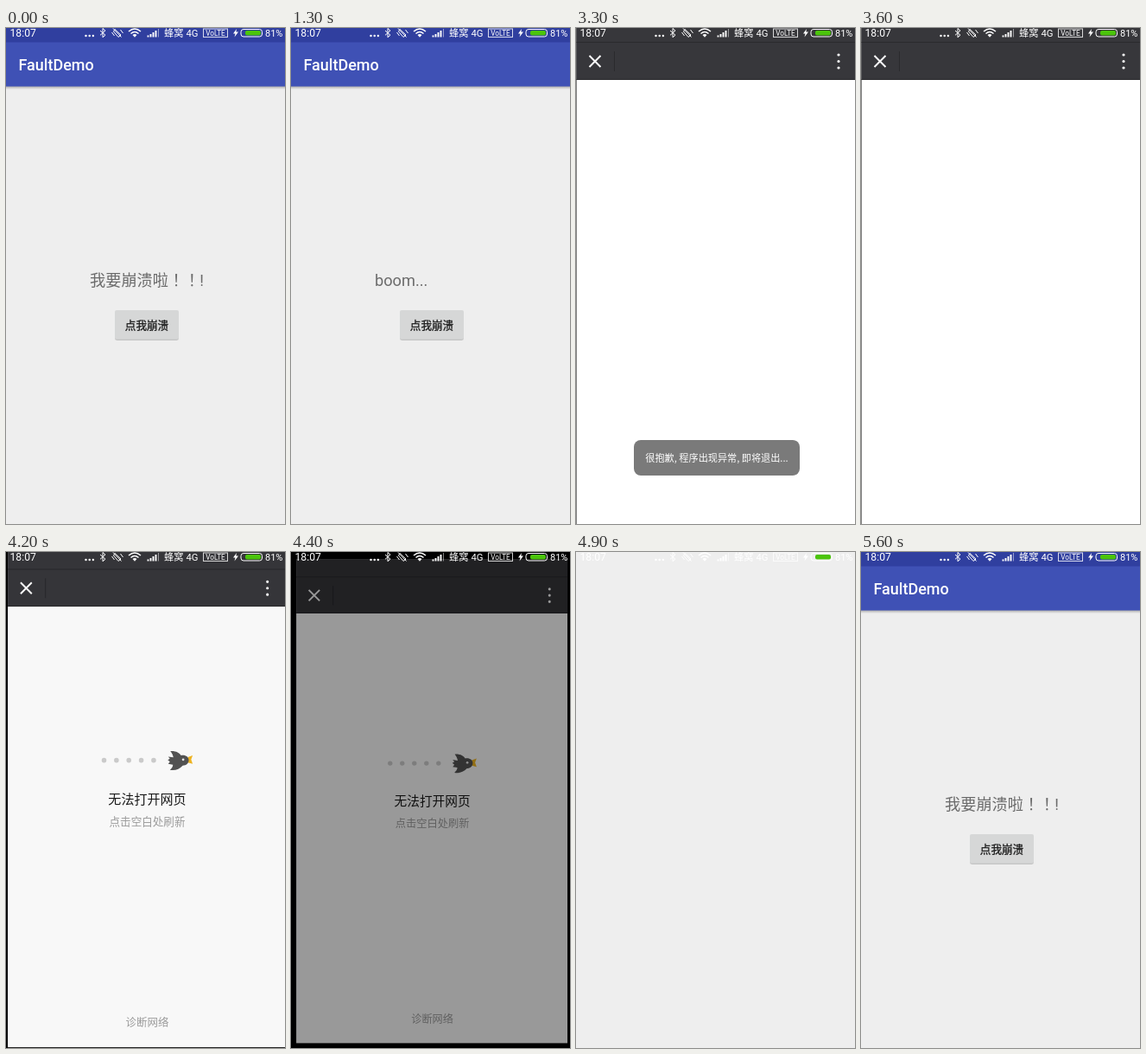
An HTML page that plays this animation: 323x573 px, repeating every 6.6 s.

```html
<!DOCTYPE html>
<html lang="zh-CN">
<head>
<meta charset="utf-8">
<title>Crash demo</title>
<style>
  html, body { margin: 0; width: 100%; height: 100%; overflow: hidden; background: #000; }
  svg { display: block; width: 100%; height: 100%; }
  text { font-family: Roboto, "Noto Sans CJK SC", "Noto Sans CJK", sans-serif; }
  .cjk { font-family: "Noto Sans CJK SC", "Noto Sans CJK", sans-serif; }
  .wide { font-family: "Noto Sans CJK JP", "Noto Sans CJK", sans-serif; }
  .mid { text-anchor: middle; }
  .line { fill: none; stroke: #fff; }
</style>
</head>
<body>
<svg viewBox="0 0 323 573">
  <defs>
    <linearGradient id="shade" x2="0" y2="1">
      <stop stop-opacity=".3"/>
      <stop offset="1" stop-opacity="0"/>
    </linearGradient>
  </defs>

  <g id="home">
    <rect width="323" height="573" fill="#eee"/>
    <rect y="67" width="323" height="4" fill="url(#shade)"/>
    <rect y="16" width="323" height="51.5" fill="#3f51b5"/>
    <rect width="323" height="16.5" fill="#303f9f"/>
    <text x="14.5" y="49" font-size="18" font-weight="500" fill="#fff">FaultDemo</text>
    <g font-size="18.2" fill="#6b6b6b">
      <text id="before" x="97" y="298">我要崩溃啦<tspan class="wide" lang="ja">！！</tspan>!</text>
      <text id="after" x="97" y="298">boom...</text>
    </g>
    <rect x="126" y="327" width="74" height="34" rx="2.5" opacity=".1"/>
    <rect x="126.5" y="327" width="73" height="33.4" rx="2" opacity=".15"/>
    <rect id="button" x="126" y="326" width="74" height="33.7" rx="2"/>
    <text class="cjk mid" x="163" y="347.7" font-size="12.6" fill="#1c1c1c" stroke="#1c1c1c" stroke-width=".3">点我崩溃</text>
  </g>

  <g id="page">
    <rect x=".5" y="-5" width="325" height="579" fill="#fff"/>
    <rect x=".5" y="-5" width="325" height="65" fill="#37373b"/>
    <path d="M.5 16.5h325M.5 59.5h325M44.5 27V50" stroke="#2a2a2d"/>
    <path class="line" d="M15.5 32l13 13m0-13l-13 13" stroke-width="2"/>
    <path class="line" d="M304 31h0m0 7.5h0m0 7.5h0" stroke-width="3.2" stroke-linecap="round"/>
    <g id="error">
      <path d="M113 239.3h0m14.5 0h0m14.5 0h0m14.5 0h0m14.5 0h0" stroke="#d0d0d0" stroke-width="5.6" stroke-linecap="round"/>
      <path d="M211 235.5l5.6-2-1.8 5 1.8 5-5.6-1.5z" fill="#f5b921"/>
      <path d="M190.5 228.5C197 228 201 230.5 203 233.5C208 232.5 212 235 212 239C212 243 209 245.5 205 245.5C201 250 196 251.5 190 250.5C192.5 248.5 193.5 246.5 193.5 244.5L188 243.5L190 241L187.5 239L190 237.5L188 235L194 236C193.5 233 192.5 231 190.5 228.5Z" fill="#555"/>
      <circle cx="205.5" cy="238.5" r="1.4" fill="#eee"/>
      <g class="mid">
        <text class="cjk" x="163.5" y="290" font-size="15.2" fill="#1a1a1a">无法打开网页</text>
        <text class="cjk" x="163.5" y="315.5" font-size="12.7" fill="#a0a0a0">点击空白处刷新</text>
        <text class="cjk" x="163.5" y="549.4" font-size="12.6" fill="#a0a0a0">诊断网络</text>
      </g>
    </g>
  </g>

  <rect id="splash" width="323" height="573" fill="#eee"/>

  <g id="toast">
    <rect x="67" y="476" width="192" height="41" rx="8" fill="#595959"/>
    <text class="cjk mid" x="163" y="501" font-size="11.15" fill="#fff">很抱歉, 程序出现异常, 即将退出...</text>
  </g>

  <g id="status" fill="#fff">
    <text x="4.5" y="10" font-size="12.2">18:07</text>
    <path class="line" d="M92.5 9h0m4.2 0h0m4.2 0h0" stroke-width="2.5" stroke-linecap="round"/>
    <path class="line" d="M109 3l6 5.2-3 2.6v-10.3l3 2.6-6 5.2"/>
    <path class="line" d="M126 1.5l7 6.5-3 2.5-5.5-6.5zM122.5 5l3 4m7-7l3 4M124 .5l9.5 10"/>
    <path class="line" d="M142 4q7-6 14 0M144.5 6.500q4.5-4 9 0" stroke-width="1.5"/>
    <path d="M146.5 8q2.5-2 5 0l-2.5 2.8z"/>
    <path class="line" d="M164.5 10.5v-2m3 2v-3.5m3 3.5v-5.5m3 5.5v-7.5" stroke-width="1.9"/>
    <path class="line" d="M176.5 10.5v-9.5" opacity=".5"/>
    <text x="183" y="10" font-size="11.3">蜂窝 4G</text>
    <rect class="line" x="228.5" y="1" width="28" height="9.5" opacity=".8"/>
    <text class="mid" x="242.5" y="8.8" font-size="8.2">VoLTE</text>
    <path d="M267 1l-4 5.5h2.5l-1 4 4.5-6h-2.7z"/>
    <rect class="line" x="272" y="1.5" width="24.5" height="8.5" rx="3"/>
    <rect x="277" y="3" width="18" height="5.5" rx="2" fill="#4bc40c"/>
    <text x="300" y="10" font-size="11">81%</text>
  </g>
</svg>
<script>
const LOOP = 6600, STEP = 100;
const $ = id => document.getElementById(id);
const clamp = v => Math.min(1, Math.max(0, v));
const ramp = (t, start, duration) => clamp((t - start) / duration);
const easeOut = (p, power) => 1 - (1 - p) ** power;

const opacity = (id, v) => $(id).setAttribute('opacity', v);
const move = (id, v) => $(id).setAttribute('transform', v);
const show = (id, on) => $(id).style.display = on ? '' : 'none';
const scaleAbout = (x, y, s) => `translate(${x} ${y}) scale(${s}) translate(${-x} ${-y})`;

function draw(t) {
  // Home screen and the button press
  const restarted = t >= 5300;
  const tapped = t >= 1200 && !restarted;
  show('home', t < 3300 || restarted);
  show('before', !tapped);
  show('after', tapped);
  $('button').setAttribute('fill', t >= 1100 && t < 1300 ? '#c4c5c5' : '#d6d7d7');

  // Toast fades in, and out again over the web page
  show('toast', t >= 1700 && t < 3600);
  opacity('toast', t < 3300 ? easeOut(ramp(t, 1660, 500), 2) : 1 - ramp(t, 3076, 500) ** 2);

  // Web page recedes into black
  const leave = Math.max(0, t - 4050) / 350;
  show('page', t >= 3300 && t < 4900);
  show('error', t >= 3800);
  opacity('page', 1 - clamp(.4 * leave ** 3.2));
  move('page', scaleAbout(165, 380, 1 - .034 * leave ** 1.5));

  // Blank start window slides up, then dissolves into the home screen
  show('splash', t >= 4500 && t < 5600);
  move('splash', `translate(0 ${630 * (1 - easeOut(ramp(t, 4440, 500), 5))})`);
  opacity('splash', 1 - ramp(t, 5200, 400));
}

function tick(now) {
  draw(Math.floor(now % LOOP / STEP) * STEP);
  requestAnimationFrame(tick);
}
draw(0);
requestAnimationFrame(tick);
</script>
</body>
</html>
```
